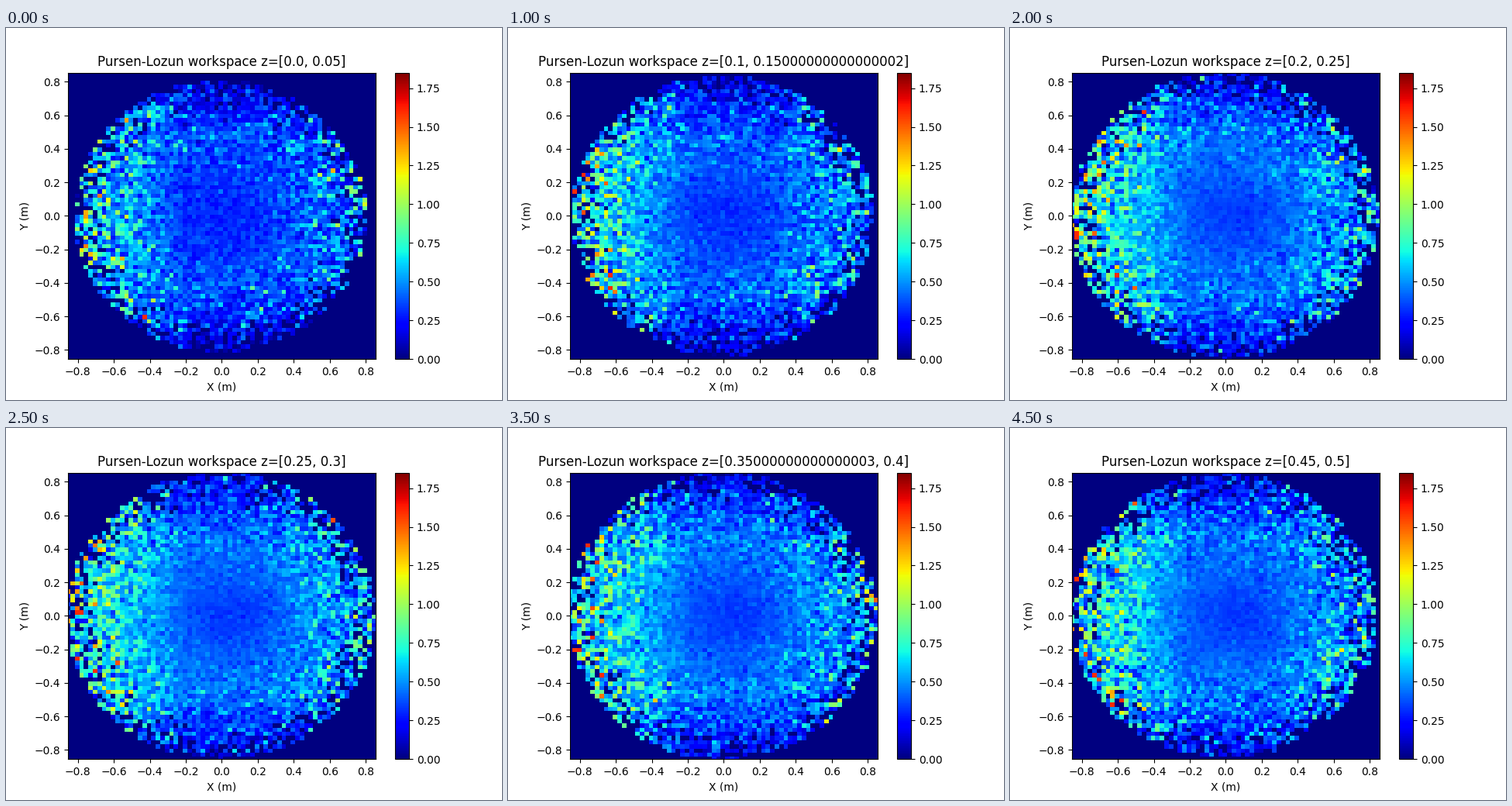
These frames come from a looping animation (640 by 480 pixels, 5 s). A matplotlib script:

```python
import numpy as np
import matplotlib.pyplot as plt
from matplotlib.animation import FuncAnimation

FRAMES = 10
DZ = 0.05        # slice thickness in metres
CELL = 0.025
REACH = 0.855
BASE_Z = 0.333   # height of the reach sphere's centre
VMAX = 1.85

axis = np.arange(-REACH, REACH, CELL)
X, Y = np.meshgrid(axis, axis)


def ramp(v, start, end):
    return np.clip((v - start) / (end - start), 0, 1)


def workspace(i):
    """Cell values of slice i: calm centre, noisy rim, stronger on the left."""
    rng = np.random.default_rng(40 + i)
    gap = BASE_Z - np.clip(BASE_Z, i * DZ, (i + 1) * DZ)
    radius = np.sqrt(0.86 ** 2 - gap ** 2)
    q = np.hypot(X + 0.008, Y) / radius
    late = min(1, i / 4)

    left, right = ramp(-X, 0.2, 0.75), ramp(X, 0.3, 0.7)
    polar = ramp(np.abs(Y), 0.45, 0.85)
    mean = 0.29 + 0.08 * late + 0.10 * ramp(q, 0.1, 0.6)
    mean += 0.27 * left + 0.06 * right - 0.24 * polar * (1 - 0.7 * left)
    mean -= 0.05 * late * np.exp(-((X - 0.15) ** 2 + Y ** 2) / 0.04)

    spread = 0.14 - 0.08 * late + 0.47 * np.clip(q, 0, 1) ** 2.2
    shape = 1 / spread ** 2
    value = np.minimum(mean * rng.gamma(shape) / shape, 1.6)

    empty = 0.42 * ramp(q, 0.75, 1) ** 1.4
    value[(rng.random(X.shape) < empty) | (q > 1)] = 0
    return value


def title(i):
    z = i * DZ
    return f"Pursen-Lozun workspace z=[{z}, {z + DZ}]"


fig, ax = plt.subplots(figsize=(6.4, 4.8), dpi=100)
mesh = ax.pcolormesh(axis, axis, workspace(0), cmap="jet", vmin=0, vmax=VMAX,
                     shading="nearest")
ax.set(xlim=(-REACH, REACH), ylim=(-REACH, REACH), xlabel="X (m)", ylabel="Y (m)")
head = ax.set_title(title(0))
fig.colorbar(mesh, ax=ax)


def update(i):
    mesh.set_array(workspace(i))
    head.set_text(title(i))
    return mesh, head


anim = FuncAnimation(fig, update, frames=FRAMES, interval=500, repeat=True,
                     repeat_delay=0, blit=False)
plt.show()
```
